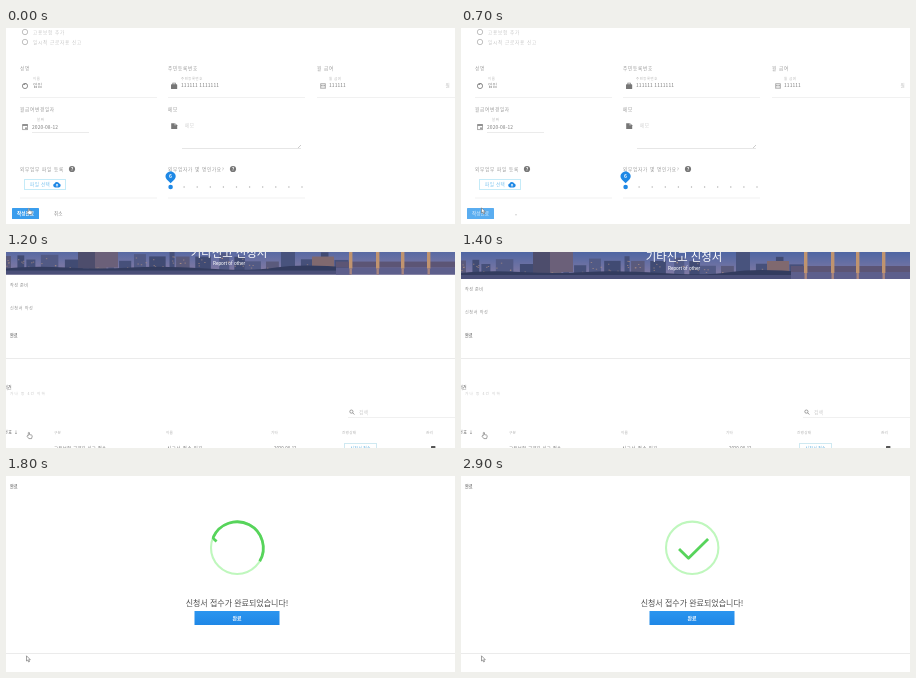
An HTML page that plays this animation: 449 px wide and 196 px high, repeating every 3000 ms.

```html
<!DOCTYPE html>
<html lang="ko">
<head>
<meta charset="utf-8">
<title>신청서</title>
<style>
html, body { margin: 0; width: 100%; height: 100%; overflow: hidden; background: #fff; }
svg { display: block; width: 449px; height: 196px; font-family: "Noto Sans CJK KR", "Noto Sans CJK", "Noto Sans", sans-serif; }
</style>
</head>
<body>
<svg id="stage" viewBox="0 0 449 196"></svg>
<script>
const LOOP = 3000, STEP = 100;
const svg = document.getElementById('stage');

// y is the vertical middle of the text
const text = (x, y, size, fill, str, more = '') =>
  `<text x="${x}" y="${y + size * 0.36}" font-size="${size}" fill="${fill}" ${more}>${str}</text>`;
const rect = (x, y, w, h, fill, more = '') =>
  `<rect x="${x}" y="${y}" width="${w}" height="${h}" fill="${fill}" ${more}/>`;
const line = (x1, x2, y, color = '#f1f1f1') => rect(x1, y, x2 - x1, 1, color);
const circle = (x, y, r, fill, more = '') => `<circle cx="${x}" cy="${y}" r="${r}" fill="${fill}" ${more}/>`;
const path = (d, fill, more = '') => `<path d="${d}" fill="${fill}" ${more}/>`;
const group = (id, body, more = '') => `<g id="${id}" ${more}>${body}</g>`;
const mid = 'text-anchor="middle"';
const gap = n => `letter-spacing="${n}"`;

const label = (x, y, str) => text(x, y, 4.6, '#999', str, gap(0.75));
const hint = (x, y, str) => text(x, y, 3.3, '#b5b5b5', str, gap(0.6));
const value = (x, y, str) => text(x, y, 4.9, '#808080', str, gap(0.1));
const radio = (y, str) => circle(19, y, 2.7, 'none', 'stroke="#b0b0b0" stroke-width=".8"') +
  text(27, y, 4.6, '#c8c8c8', str, gap(0.75));
const help = (x, y) => circle(x, y, 3.1, '#777') + text(x, y, 5, '#fff', '?', mid + ' font-weight="700"');

function form() {
  let out = radio(4, '고용보험 추가') + radio(14, '일시적 근로자용 신고');
  out += label(14, 40, '성명') + label(162, 40, '주민등록번호') + label(311, 40, '월 급여');
  out += hint(27, 51, '이름') + hint(175, 51, '주민등록번호') + hint(323, 51, '월 급여');
  out += value(27, 57.6, '임임') + value(175, 57.6, '111111 1111111') + value(323, 57.6, '111111');
  out += text(439.5, 57.6, 4.6, '#bbb', '원');
  // icons
  out += circle(19, 58, 2.6, 'none', 'stroke="#777" stroke-width=".8"') +
    path('M16.5 57Q19 57.5 20 55.2Q21 57 21.8 57L20 55Z', '#777');
  out += rect(165, 56.3, 6.2, 4.8, '#777', 'rx=".6"') +
    rect(166.8, 55.1, 2.6, 2, 'none', 'stroke="#777" stroke-width=".7"');
  out += rect(314.2, 55.3, 5.6, 5.4, '#aaa', 'rx=".5"') +
    [56.3, 58, 59.5].map(y => rect(315, y, 4, 0.6, '#fff')).join('') + rect(316.7, 56, 0.6, 4, '#fff');
  out += line(14, 151, 69) + line(162, 299, 69) + line(311, 449, 69);

  out += label(14, 81, '월급여변경일자') + label(162, 81, '메모');
  out += rect(16.7, 96.7, 4.8, 5, 'none', 'stroke="#888" stroke-width=".7"') + rect(16.4, 96.2, 5.4, 1.7, '#888') +
    rect(19.2, 99.4, 1.6, 1.6, '#888');
  out += hint(31, 92.3, '날짜') + value(26, 99, '2020-08-12') + line(26, 83, 104, '#ebebeb');
  out += path('M165.2 95.2H169.2L171.2 97.2V101H165.2Z', '#777') + rect(168.7, 95.2, 0.7, 2.2, '#fff');
  out += text(179, 97.3, 4.6, '#d0d0d0', '메모', gap(0.5)) + line(176, 295, 120, '#e6e6e6') +
    path('M292 120L295 117', 'none', 'stroke="#aaa" stroke-width=".6"');

  out += label(14, 141, '외부업무 파일 등록') + help(66, 141);
  out += label(162, 141, '외부업자가 몇 명인가요?') + help(227, 141);
  out += rect(18.5, 151.5, 41, 10, '#fff', 'stroke="#c5ebf8"') +
    text(24, 156.6, 4.6, '#7cc3ef', '파일 선택', gap(0.4)) +
    path('M49 159.4A2 2 0 0 1 48.6 155.5A2.6 2.6 0 0 1 53.3 155.6A1.95 1.95 0 0 1 53 159.4Z', '#1e88e5') +
    path('M51 155.7L52.4 157.3H51.5V158.6H50.5V157.3H49.6Z', '#fff');
  for (let i = 1; i <= 10; i++) out += circle(165 + i * 13.1, 159, 0.7, '#b0b0b0');
  out += circle(164.6, 159, 2.3, '#1e88e5');
  out += path('M164.6 155.2L160.8 151.4A4.9 4.9 0 1 1 168.4 151.4Z', '#1e88e5') +
    text(164.6, 148.2, 5, '#fff', '6', mid + ' font-weight="700"');
  out += line(14, 151, 169.5) + line(162, 299, 169.5);

  out += rect(6, 180, 27, 11, '#3a9ded', 'rx=".6"');
  out += text(19.5, 185.2, 4.6, '#fff', '작성완료', mid + ' id="submitText" font-weight="700"');
  out += circle(22, 185.5, 1, '#fff', 'id="ripple" opacity=".16" clip-path="url(#btnClip)"');
  return out + text(48, 185.2, 4.6, '#8c8c8c', '취소', 'id="cancel"') + circle(55, 186.8, 0.55, '#999', 'id="dot"');
}

function header() {
  let out = rect(0, -140, 449, 167, 'url(#sky)');
  let seed = 11;
  const rnd = () => (seed = (seed * 16807) % 2147483647) / 2147483647;
  const tones = ['#46507a', '#5a5a7c', '#414b73', '#6c6479', '#525a85'];
  for (let x = 0; x < 330;) {
    const w = 5 + rnd() * 13, top = 4 + rnd() * 10;
    out += rect(x, top, w, 24 - top, tones[Math.floor(rnd() * 5)]);
    for (let k = 0; k < 4; k++) out += rect(x + rnd() * w, top + 2 + rnd() * 9, 1.4, 0.9, '#c39d86', 'opacity=".6"');
    x += w + rnd() * 9;
  }
  out += rect(72, -9, 17, 30, '#4d4d6c') + rect(89, -6, 23, 26, '#6b6079') + rect(275, -7, 14, 28, '#48537d') +
    rect(306, 9, 22, 11, '#80696f');
  out += path('M0 21Q25 18 60 20T125 20T200 21T270 20T345 20V24H0Z', '#333c5f') + rect(0, 23, 345, 4, '#4a4f78');
  out += rect(330, 14, 119, 6, '#5c5575') + rect(330, 20, 119, 7, '#5d5f8c');
  for (const x of [343, 370, 395, 421]) out += rect(x, -6, 3.4, 27, '#c0946f') + rect(x + 0.5, 21, 2.4, 6, '#a8857f');
  out += text(223, 5, 11.4, '#fff', '기타신고 신청서', mid + ' font-weight="500"');
  out += text(223, 16, 4.8, '#fff', 'Report of other', mid + ' font-family="Roboto, sans-serif"');
  return out + text(4, 38, 4.1, '#858585', '작성 준비', gap(0.45)) + text(4, 60.5, 4.1, '#959595', '신청서 작성', gap(0.55));
}

function table() {
  let out = rect(0, 106, 449, 130, '#fff') + line(0, 449, 106, '#ebebeb');
  out += text(-2, 135, 4.2, '#666', '의견') + text(4, 142, 3.6, '#c5c5c5', '가나 등 4건 이하', gap(1.1));
  out += circle(345.4, 159.6, 1.6, 'none', 'stroke="#888" stroke-width=".8"') +
    path('M346.6 160.8L348.3 162.5', 'none', 'stroke="#888" stroke-width=".9"');
  out += text(353, 160.2, 4.6, '#c8c8c8', '검색', gap(0.4)) + line(342, 449, 165, '#f0f0f0');
  const heads = [[48, '구분'], [160, '이름'], [265, '기타'], [336, '진행상태'], [420, '관리']];
  out += text(-2, 180.5, 4, '#444', '번호 ↓', gap(0.5));
  for (const [x, s] of heads) out += text(x, 180.5, 3.6, '#b0b0b0', s, gap(0.3));
  out += text(48, 196.5, 4.4, '#777', '고용보험 근로자 신고 접수', gap(0.3)) + text(161, 196.5, 4.4, '#777', '신고서 접수 일자', gap(0.6)) +
    text(268, 196.5, 4.4, '#777', '2020-08-12');
  out += rect(338.5, 191.5, 32, 10, '#fff', 'stroke="#cfe9f1"') + text(354.5, 196.5, 4.2, '#6bb5e0', '신청서 접수', mid);
  return out + rect(425, 194, 4.4, 5, '#555', 'rx=".5"');
}

function done() {
  let out = circle(231.2, 71.8, 26.2, 'none', 'stroke="#bff7bd" stroke-width="2.1"');
  out += path('M253.7 85.3A26.2 26.2 0 1 0 207.3 61.1C206.7 62.3 207.6 62.6 209 64L227.5 82.3L253 57',
    'none', 'id="check" stroke="#57d45b" stroke-width="2.8" stroke-linejoin="round"');
  out += text(231, 127.6, 8, '#505050', '신청서 접수가 완료되었습니다!', mid);
  return out + rect(188.5, 135, 85, 14, 'url(#blue)') + text(231, 141.8, 4.9, '#fff', '완료', mid + ' font-weight="700"');
}

svg.innerHTML = `<defs>
  <linearGradient id="sky" x1="0" y1="0" x2="0" y2="1">
    <stop offset="0" stop-color="#33518f"/><stop offset=".84" stop-color="#4f66a3"/><stop offset="1" stop-color="#8a7da3"/>
  </linearGradient>
  <linearGradient id="blue" x1="0" y1="0" x2="0" y2="1">
    <stop offset="0" stop-color="#2b95ef"/><stop offset="1" stop-color="#1f87e6"/>
  </linearGradient>
  <clipPath id="btnClip"><rect x="6" y="180" width="27" height="11"/></clipPath>
  <clipPath id="formClip"><rect id="formBox" x="0" width="449"/></clipPath>
  <clipPath id="doneClip"><rect id="doneBox" x="0" width="449"/></clipPath></defs>` +
  group('header', header()) +
  group('formWrap', group('form', form()), 'clip-path="url(#formClip)"') +
  group('title', text(4, 0, 4.2, '#444', '완료')) +
  group('doneWrap', group('done', done()), 'clip-path="url(#doneClip)"') +
  group('table', table()) +
  group('arrow', path('M20.5 179.8V185L21.7 184L22.6 186L23.5 185.6L22.7 183.7H24.3Z', '#fff', 'stroke="#666" stroke-width=".6"')) +
  group('hand', path('M22.3 183.6V180.7Q22.9 179.8 23.5 180.7V182.6L25.7 183.1Q26.3 183.4 26.2 184.2L25.6 186.6H22.8L21 184.2Q21.2 183.2 22.3 183.6Z',
    '#fff', 'stroke="#666" stroke-width=".6"'));

const el = id => document.getElementById(id);
const set = (id, attrs) => { for (const k in attrs) el(id).setAttribute(k, attrs[k]); };
const shift = (id, y) => set(id, { transform: `translate(0 ${y})` });
const show = (id, on) => set(id, { display: on ? 'inline' : 'none' });
const clamp = v => Math.max(0, Math.min(1, v));
const mix = (a, b, p) => a + (b - a) * p;

function bezier(x1, y1, x2, y2) {
  const at = (a, b, s) => 3 * (1 - s) * (1 - s) * s * a + 3 * (1 - s) * s * s * b + s * s * s;
  return x => {
    let lo = 0, hi = 1;
    for (let i = 0; i < 24; i++) {
      const s = (lo + hi) / 2;
      if (at(x1, x2, s) < x) lo = s; else hi = s;
    }
    return at(y1, y2, hi);
  };
}
const swing = bezier(0.25, 0.8, 0.5, 1);
const smooth = bezier(0.65, 0, 0.35, 1);
const spring = bezier(0.25, 0.25, 0.25, 1.25);
const phase = (t, from, span, ease) => {
  const x = clamp((t - from) / span);
  return x === 0 || x === 1 ? x : ease(x);
};

const FORM_H = 330, DONE_H = 144;
const total = el('check').getTotalLength();
const corner = total - Math.hypot(25.5, 25.3);

function draw(t) {
  // one step folds up, then the next one opens while the page scrolls to it
  const h = FORM_H * (1 - phase(t, 960, 300, swing));
  const g = DONE_H * phase(t, 1410, 300, swing);
  // the page bottom holds the last step at 83 once the form is short enough
  const y = Math.max(83, 215 - (FORM_H - h)) - 73 * phase(t, 1400, 400, smooth);
  const top = y - 14.5 - h;

  shift('header', y - 83 - h);
  shift('form', top + 129.5);
  set('formBox', { y: top, height: h });
  show('formWrap', h > 0);
  shift('title', y);
  shift('done', y - 10);
  set('doneBox', { y: y + 15, height: g + 8 });
  show('doneWrap', g > 0);
  shift('table', y - 83 + g);

  const press = clamp((t - 300) / 300);
  set('submitText', { opacity: 1 - 0.45 * press });
  set('ripple', { r: 18 * press });
  set('cancel', { opacity: 1 - press });
  set('dot', { opacity: press });

  const hand = t < 400 || (t >= 1100 && t < 1500);
  show('hand', hand);
  show('arrow', !hand);

  // the stroke runs round the ring into the tick, its tail following later
  const front = mix(0, corner + 27, phase(t, 1500, 1040, spring));
  const tail = mix(0, corner - 13.9, phase(t, 1800, 550, spring));
  show('check', front > tail);
  set('check', { 'stroke-dasharray': `0 ${tail} ${Math.max(0, front - tail)} ${total}` });
}

let start;
function tick(now) {
  if (start === undefined) start = now;
  draw(Math.floor(((now - start) % LOOP) / STEP) * STEP);
  requestAnimationFrame(tick);
}
draw(0);
requestAnimationFrame(tick);
</script>
</body>
</html>
```
